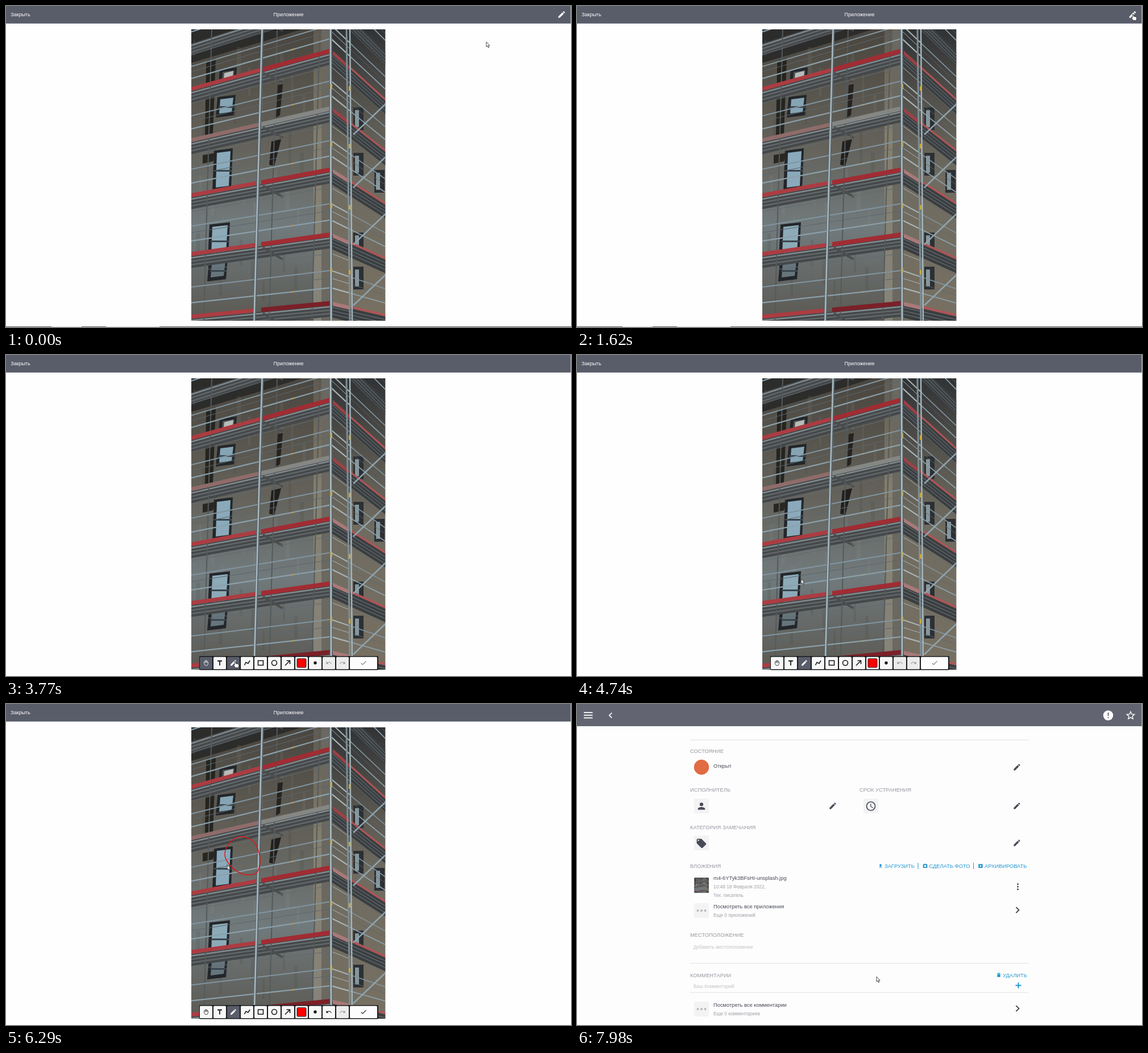
These frames come from a looping animation (994 px wide and 564 px high, 8.03 s). An HTML page:

```html
<!DOCTYPE html>
<html lang="ru">
<head>
<meta charset="utf-8">
<style>
html, body { margin: 0; width: 100%; height: 100%; overflow: hidden; background: #fefefe; }
svg { display: block; width: 994px; height: 564px; font-family: "Liberation Sans", Arial, sans-serif; }
</style>
</head>
<body>
<svg id="stage" viewBox="0 0 994 564"></svg>
<script>
const ICONS = {
  pencil: 'M3 17.25V21h3.75L17.81 9.94l-3.75-3.75zM20.71 7.04a1 1 0 000-1.41l-2.34-2.34a1 1 0 00-1.41 0l-1.83 1.83 3.75 3.75z',
  person: 'M12 12a4 4 0 100-8 4 4 0 000 8zm0 2c-2.67 0-8 1.34-8 4v2h16v-2c0-2.66-5.33-4-8-4z',
  clock: 'M12 2a10 10 0 100 20 10 10 0 000-20zm0 18a8 8 0 110-16 8 8 0 010 16zM12.5 7H11v6l5.2 3.1.8-1.2-4.5-2.7z',
  tag: 'M21.41 11.58l-9-9A2 2 0 0011 2H4a2 2 0 00-2 2v7c0 .55.22 1.05.59 1.42l9 9c.8.8 2 .8 2.82 0l7-7c.8-.8.8-2 0-2.84zM5.5 7a1.5 1.5 0 110-3 1.5 1.5 0 010 3z',
  star: 'M22 9.24l-7.19-.62L12 2 9.19 8.63 2 9.24l5.46 4.73L5.82 21 12 17.27 18.18 21l-1.63-7.03zM12 15.4l-3.76 2.27 1-4.28-3.32-2.88 4.38-.38L12 6.1l1.71 4.04 4.38.38-3.32 2.88 1 4.28z',
  undo: 'M12.5 8c-2.65 0-5.05.99-6.9 2.6L2 7v9h9l-3.62-3.62c1.39-1.16 3.16-1.88 5.12-1.88 3.54 0 6.55 2.31 7.6 5.5l2.37-.78C21.08 11.03 17.15 8 12.5 8z',
  redo: 'M11.5 8c2.65 0 5.05.99 6.9 2.6L22 7v9h-9l3.62-3.62c-1.39-1.16-3.16-1.88-5.12-1.88-3.54 0-6.55 2.31-7.6 5.5l-2.37-.78C2.92 11.03 6.85 8 11.5 8z',
  check: 'M9 16.2L4.8 12l-1.4 1.4L9 19 21 7l-1.4-1.4z',
  chevron: 'M6 4l2.5-2.5L19 12 8.5 22.5 6 20l8-8z',
  back: 'M15.4 7.4L14 6l-6 6 6 6 1.4-1.4L10.8 12z',
  upload: 'M5 20h14v-3H5zM9 16h6v-6h5l-8-8-8 8h5z',
  camera: 'M9 2L7 4H2v17h20V4h-5l-2-2zm3 15.5a5 5 0 110-10 5 5 0 010 10z',
  archive: 'M2 3h20v18H2zM10 8v4H7l5 5 5-5h-3V8z',
  trash: 'M5 8h14v14H5zM4 4h4l1-2h6l1 2h4v2H4z',
  hand: 'M8 22l-4-7V8l3-3 3-3 4 1 4 3 2 3v7l-3 6zM8 5v7M12 3v9M16 5v7'
};
const DARK = '#484b57', BLUE = '#2596d2';

const rect = (x, y, w, h, fill, more = '') => `<rect x="${x}" y="${y}" width="${w}" height="${h}" fill="${fill}" ${more}/>`;
const poly = (points, fill) => `<polygon points="${points}" fill="${fill}"/>`;
const line = (x1, y1, x2, y2, color, width = 1, more = '') =>
  `<path d="M${x1} ${y1}L${x2} ${y2}" stroke="${color}" stroke-width="${width}" ${more}/>`;
const circle = (x, y, r, fill) => `<circle cx="${x}" cy="${y}" r="${r}" fill="${fill}"/>`;
const text = (x, y, content, fill, size = 9.33, more = '') =>
  `<text x="${x}" y="${y}" font-size="${size}" fill="${fill}" ${more}>${content}</text>`;
const icon = (name, x, y, size, fill, more = '') =>
  `<path d="${ICONS[name]}" fill="${fill}" fill-rule="evenodd" transform="translate(${x - size / 2} ${y - size / 2}) scale(${size / 24})" ${more}/>`;

// Heights of storey d at the left edge, the corner and the right edge.
const leftEdge = d => 146 + 86.7 * d + 3.33 * d * d;
const corner = d => 79 + 98 * d + 3.2 * d * d;
const rightEdge = d => 165 + 88 * d + 1.7 * d * d;
const onLeft = (x, d) => leftEdge(d) + (corner(d) - leftEdge(d)) * (x - 327) / 243;
const onRight = (x, d) => corner(d) + (rightEdge(d) - corner(d)) * (x - 572) / 95;

function band(x1, x2, at, d, top, bottom, fill) {
  const a = at(x1, d), b = at(x2, d);
  return poly(`${x1},${a + top} ${x2},${b + top} ${x2},${b + bottom} ${x1},${a + bottom}`, fill);
}

function rail(x1, x2, at, d, color, width) {
  return line(x1, at(x1, d), x2, at(x2, d), color, width);
}

function windowAt(x, y, w, h, glass) {
  return poly(`${x},${y + 4} ${x + w},${y} ${x + w - 3},${y + h - 4} ${x - 3},${y + h}`, '#23262a') +
    poly(`${x + 5},${y + 8} ${x + w - 4},${y + 5} ${x + w - 7},${y + h - 10} ${x + 3},${y + h - 7}`, glass) +
    rect(x + 2, y + h * .5, w - 4, 3, '#3a464d');
}

function building() {
  let s = rect(326, 41, 342, 512, 'url(#wall)') + rect(541, 41, 14, 512, 'url(#pillar)') +
    rect(555, 41, 17, 512, '#6a6860') + rect(572, 41, 96, 512, 'url(#side)') +
    poly('326,41 520,41 450,63 326,100', '#2c2c2b');
  for (let i = 0; i < 34; i++) {
    const x = 330 + i * 71 % 208, y = 60 + i * 113 % 440;
    s += rect(x, y, 3 + i % 5, 28 + i * 7 % 30, i % 2 ? '#25221e' : '#a5a69c', 'opacity=".09"');
  }
  s += windowAt(376, 108, 30, 42, '#4b5354') + windowAt(372, 156, 32, 40, '#86a5b4') +
    windowAt(366, 250, 33, 76, '#8aaabb') + windowAt(358, 380, 36, 64, '#8caab8') + windowAt(357, 444, 33, 40, '#66757c');
  s += poly('384,118 400,114 399,124 383,128', '#b9bcb8');
  s += poly('352,97 369,92 364,226 350,230', '#25241f') + poly('478,139 487,137 482,192 475,196', '#25221f') +
    poly('467,238 484,234 472,281 463,279', '#211f1e') + poly('346,262 369,258 364,273 346,277', '#292722');
  for (const y of [178, 258, 288, 398, 458])
    s += rect(y === 288 ? 648 : 611, y, 18, 40, '#2c3034') + rect(y === 288 ? 651 : 614, y + 5, 7, 30, '#86969b');

  for (let k = -1; k < 5; k++) {
    s += band(326, 571, onLeft, k, 3, 24, '#45484a') + band(572, 668, onRight, k, 1, 25, '#3a3e40');
    for (let i = 0; i < 3; i++) {
      s += band(326, 571, onLeft, k, 5 + i * 6, 7.5 + i * 6, i ? '#62686a' : '#828c90');
      s += band(572, 668, onRight, k, 6 + i * 6, 7.5 + i * 6, '#61696d');
    }
    s += line(452, onLeft(452, k) + 6, 487, onLeft(487, k) + 32, '#4b4d4e', 4);
  }
  for (const x of [362, 477, 552]) s += line(x, 41, x - 14, 553, '#54595a', 2);
  for (let k = -1; k < 6; k++) {
    for (const [up, width, color] of [[.22, 2.2, '#8ba0ab'], [.47, 2, '#8094a0'], [.36, 1, '#5c666c'], [.72, 1, '#626b71']]) {
      s += rail(326, 572, onLeft, k - up, color, width) + rail(604, 668, onRight, k - up, color, width * .8) +
        rail(572, 604, onRight, k - up, '#a9b5b8', width);
    }
    s += circle(504, onLeft(504, k - .22), 1.5, '#c59643');
    if (k < 0) continue;
    const pale = k === 1;
    s += band(326, k > 1 ? 440 : 446, onLeft, k, -4, 3, pale ? '#8f6c6a' : '#ac3c42');
    s += band(449, 570, onLeft, k, -4, 4, pale ? '#858784' : k === 4 ? '#7b2028' : '#a22c33');
    s += band(575, 604, onRight, k, -3, 4, k > 1 ? '#a97978' : '#9b4145') +
      band(607, 668, onRight, k, -3, 1, '#b05356');
  }
  for (const y of [172, 265, 365, 472]) s += line(668, y, 611, y + 54, '#8fa4ae', 2.5);
  s += line(451, 41, 437, 553, '#56626a', 5) + line(450.5, 41, 436.5, 553, '#a9b9bf', 2.5);
  s += line(571, 41, 572, 553, '#59666e', 5) + line(571, 41, 572, 553, '#b0c0c6', 2.5);
  s += line(599, 41, 605, 553, '#7c8d95', 3) + line(605, 41, 609, 553, '#a4b5bc', 2.5);
  for (let k = 0; k < 5; k++) {
    s += rect(603, corner(k) + 62, 3, 8, '#c9a83d') + rect(570, corner(k) + 58, 4, 9, '#b6aa72');
  }
  return `<g clip-path="url(#frame)">${s}</g>`;
}

function toolbar() {
  const left = i => 341 + 24 * i;
  let s = rect(340, 529, 315, 24.5, '#17191b', 'rx="2"');
  for (let i = 0; i < 11; i++)
    s += rect(left(i), 530.5, 22, 21.5, i > 8 ? '#ececec' : '#f7f7f7', `id="tool${i}" rx="1.5"`);
  s += rect(605, 530.5, 48, 21.5, '#fdfdfd', 'id="done" rx="1.5"');
  s += icon('hand', 352, 541, 10.5, 'none', 'id="handIcon" stroke-width="1.8"');
  s += '<path d="M372 537.5h8M376 537.5v8" stroke="#17191b" stroke-width="1.8"/>';
  s += icon('pencil', 400, 541, 13, '#17191b', 'id="pencilIcon"');
  s += '<g fill="none" stroke="#17191b" stroke-width="1.6"><path d="M419.5 545l2.5-5 4 2 3-5"/>' +
    '<path d="M443.5 537h9v8h-9zM491 545.5l8-8M493.5 537h6v6"/><circle cx="472" cy="541" r="4.5"/></g>';
  s += rect(512, 533.5, 16, 15.5, '#fe0000', 'rx="1.5" stroke="#222"') + circle(544, 541, 2.7, '#17191b');
  s += icon('undo', 568, 541, 11, '#999', 'id="undoIcon"') + icon('redo', 592, 541, 11, '#999');
  return s + icon('check', 629, 541, 13, '#777', 'id="checkIcon"');
}

function issuePage() {
  const GREY = '#9698a0', PALE = '#b9bac0';
  const label = (x, y, content) => text(x, y, content, GREY);
  const action = (x, y, name, content) => icon(name, x - 7, y - 3.5, 9, BLUE) + text(x, y, content, BLUE);
  const tile = (x, y) => rect(x, y, 26, 26, '#f3f3f4', 'rx="2"');
  const more = (y, title, note) => tile(206, y - 9) + [212.5, 219, 225.5].map(x => circle(x, y + 4, 2, PALE)).join('') +
    text(240, y, title, DARK) + text(240, y + 15, note, '#a0a1a8', 8.34) + icon('chevron', 775, y + 3, 13, DARK);
  let s = rect(0, 0, 994, 564, '#fdfdfd') + rect(0, 0, 993.5, 39, '#626571');
  for (const y of [15, 19.7, 24.4]) s += line(12, y, 27.5, y, '#fff', 1.8);
  s += icon('back', 59, 20, 20, '#fff') + circle(934.5, 20, 8.7, '#fff') +
    rect(933.7, 15, 1.7, 6, '#555864') + rect(933.7, 23, 1.7, 1.8, '#555864') + icon('star', 974, 20, 20, '#fff');
  for (const y of [63, 455.5, 507]) s += line(199, y, 795, y, '#e2e2e4');
  s += label(199, 86, 'СОСТОЯНИЕ') + circle(219, 111, 13.2, '#e16b42') + text(240, 112, 'Открыт', DARK);
  s += label(199, 154, 'ИСПОЛНИТЕЛЬ') + label(497, 154, 'СРОК УСТРАНЕНИЯ') + label(199, 219.5, 'КАТЕГОРИЯ ЗАМЕЧАНИЯ');
  s += tile(206, 166) + icon('person', 219, 179.5, 19, DARK) + tile(504, 166) + icon('clock', 517, 179.5, 20, DARK);
  s += tile(206, 231) + icon('tag', 219, 245, 20, DARK);
  for (const [x, y] of [[774, 111], [450, 179], [774, 179], [774, 244]]) s += icon('pencil', x, y, 15, DARK);
  s += label(199, 288, 'ВЛОЖЕНИЯ') + action(541, 288, 'upload', 'ЗАГРУЗИТЬ') + action(619.5, 288, 'camera', 'СДЕЛАТЬ ФОТО') +
    action(717, 288, 'archive', 'АРХИВИРОВАТЬ') + line(600, 279, 600, 290, BLUE) + line(697.5, 279, 697.5, 290, BLUE);
  s += '<g clip-path="url(#thumb)"><use href="#photo" transform="translate(219 318.5) scale(.0764) translate(-497 -297)"/></g>';
  s += text(240, 309, 'm4-6YTyk3BFsHI-unsplash.jpg', DARK) + text(240, 324, '10:48 18 Февраля 2022,', '#a0a1a8', 8.34) +
    text(240, 338.5, 'Тех. писатель', '#a0a1a8', 8.34);
  for (const y of [316.5, 321, 325.5]) s += circle(775.5, y, 1.5, DARK);
  s += more(359, 'Посмотреть все приложения', 'Еще 0 приложений');
  s += label(199, 409, 'МЕСТОПОЛОЖЕНИЕ') + text(205, 430, 'Добавить местоположение', '#c2c3c8', 8.34);
  s += label(199, 479.5, 'КОММЕНТАРИИ') + action(749, 479.5, 'trash', 'УДАЛИТЬ') + text(205, 499, 'Ваш Комментарий', '#c2c3c8', 8.34);
  s += line(771.5, 494.5, 781.5, 494.5, BLUE, 2) + line(776.5, 489.5, 776.5, 499.5, BLUE, 2);
  return s + more(532, 'Посмотреть все комментарии', 'Еще 0 комментариев');
}

document.getElementById('stage').innerHTML = `
  <defs>
    <linearGradient id="wall" x2="0" y2="1"><stop stop-color="#4a463f"/><stop offset=".4" stop-color="#64625a"/>
      <stop offset=".68" stop-color="#717a7c"/><stop offset="1" stop-color="#5b5953"/></linearGradient>
    <linearGradient id="pillar" x2="0" y2="1"><stop stop-color="#5f5a50"/><stop offset=".4" stop-color="#85806f"/>
      <stop offset="1" stop-color="#86837a"/></linearGradient>
    <linearGradient id="side" x2="0" y2="1"><stop stop-color="#303234"/><stop offset=".25" stop-color="#54524c"/>
      <stop offset=".5" stop-color="#6f6b60"/><stop offset="1" stop-color="#777062"/></linearGradient>
    <clipPath id="frame">${rect(326, 41, 341.2, 512, '#000')}</clipPath>
    <clipPath id="thumb">${rect(206, 305, 26, 27, '#000', 'rx="2"')}</clipPath>
  </defs>
  ${rect(0, 0, 994, 564, '#fefefe')}${rect(0, 0, 993.5, 30.8, '#595c69')}
  ${text(8, 18, 'Закрыть', '#fff', 9)}${text(497, 18, 'Приложение', '#fff', 9, 'text-anchor="middle"')}
  <g id="viewing">${icon('pencil', 977.5, 15, 15.5, '#fff')}${rect(0, 563, 994, 1, '#55585c')}
    ${rect(80, 563, 53, 1, '#ddd')}${rect(176, 563, 94, 1, '#ddd')}</g>
  <g id="photo">${building()}</g>
  <g id="editing">${toolbar()}</g>
  <path id="mark" fill="none" stroke="#e21216" stroke-width="1.4" stroke-linecap="round"
    d="M386 257C390 245 401 233 414 233S438 242 442 252 449 276 445 289 431 300 423 300 400 292 392 281 384 264 386 257"/>
  <g id="page">${issuePage()}</g>
  <circle id="press" r="6.5" fill="#d8cf22"/>
  <g id="cursor" stroke="#222" stroke-width=".8" stroke-linejoin="round" fill="#fff">
    <path id="arrow" d="M0 0V8.7L2 7l1.5 3.3 1.4-.6L3.5 6.5H6z"/>
    <path id="pointer" d="M-1 1Q0-.6 1 1V4l4 .8Q7 5.3 6.6 7.5L6 11.5H1L-2.5 7.5Q-2.5 5.8-1 7z"/>
  </g>`;

const $ = id => document.getElementById(id);
const mark = $('mark'), markLength = mark.getTotalLength();
const DRAW = 5050, LIFT = 6030, LOOP = 8030;
const clamp = v => Math.max(0, Math.min(1, v));
const smooth = p => p * p * (3 - 2 * p);
const easeOut = p => 1 - (1 - p) ** 2.2;
const moves = [
  [30, 560, 874, 44], [740, 1530, 978, 14], [2160, 2960, 367, 451, easeOut],
  [2990, 3340, 343, 548], [3340, 3770, 403, 538], [4420, DRAW, 386, 257],
  [6060, 6860, 402, 384], [6890, 7290, 647, 541], [7690, 7950, 527, 479]
];
const presses = [[1850, 1930], [4070, 4190], [DRAW, LIFT], [7450, 7560]];
const between = (t, a, b) => t >= a && t < b;

function cursorAt(t) {
  if (between(t, DRAW, LIFT)) return mark.getPointAtLength(markLength * (t - DRAW) / (LIFT - DRAW));
  let x = 845, y = 63;
  for (const [start, end, toX, toY, ease = smooth] of moves) {
    const p = ease(clamp((t - start) / (end - start)));
    x += (toX - x) * p;
    y += (toY - y) * p;
  }
  return { x, y };
}

const show = (id, visible) => $(id).setAttribute('opacity', +visible);
const paint = (id, color, attr = 'fill') => $(id).setAttribute(attr, color);

function render(t) {
  const { x, y } = cursorAt(t);
  const edit = clamp((t - 1850) / 130);
  show('viewing', 1 - edit);
  show('editing', edit);
  show('page', clamp((t - 7720) / 260));

  const handOn = t < 4190, pencilOn = t >= 3620, drawn = t >= LIFT, doneHover = t >= 7200;
  paint('tool0', handOn ? '#595c69' : '#f7f7f7');
  paint('handIcon', handOn ? '#fff' : '#17191b', 'stroke');
  paint('tool2', pencilOn ? '#595c69' : '#f7f7f7');
  paint('pencilIcon', pencilOn ? '#fff' : '#17191b');
  paint('tool9', drawn ? '#f7f7f7' : '#ececec');
  paint('undoIcon', drawn ? '#17191b' : '#999');
  paint('done', doneHover ? '#43ab4c' : '#fdfdfd');
  paint('checkIcon', doneHover ? '#fff' : drawn ? '#17191b' : '#777');

  const progress = clamp((t - DRAW) / (LIFT - DRAW));
  const inked = drawn ? markLength : Math.max(0, markLength * progress - 12);
  mark.setAttribute('stroke-dasharray', `${inked} ${markLength * 2}`);
  show('mark', inked > 0);

  const pointing = between(t, 1500, 1980) || between(t, 3280, 4480) || between(t, 7200, 7720);
  show('arrow', !pointing);
  show('pointer', pointing);
  for (const id of ['cursor', 'press']) $(id).setAttribute('transform', `translate(${x} ${y})`);
  $('press').setAttribute('opacity', presses.some(([a, b]) => between(t, a, b)) ? .8 : 0);
}

const began = performance.now();
function tick() {
  render((performance.now() - began) % LOOP);
  requestAnimationFrame(tick);
}
tick();
</script>
</body>
</html>
```
